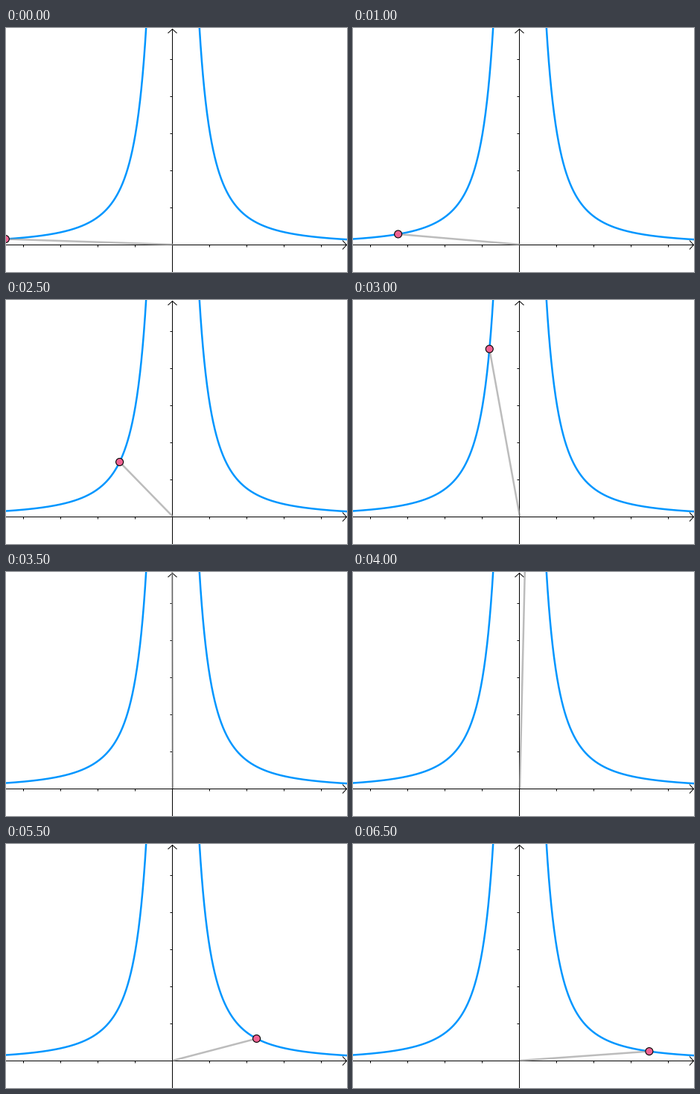
Animation of 458 by 329 pixels, one loop 7000 ms. Source, as a matplotlib script:

```python
import numpy as np
import matplotlib.pyplot as plt
from matplotlib.animation import FuncAnimation
from matplotlib.patches import Circle

W, H, DPI = 458, 329, 64
OX, OY, UNIT = 224, 292, 50      # origin of the curve
AX, AY = 223.5, 292.5            # axis lines, on pixel centres
STEPS, STEP_MS = 14, 500
START_X, STEP_X = -0.7, 30.66


def px(width):
    """Pixels to points."""
    return width * 72 / DPI


def curve_y(x):
    u = (x - OX) / UNIT
    return OY - UNIT * 3 / u ** 2


fig = plt.figure(figsize=(W / DPI, H / DPI), dpi=DPI, facecolor="white")
ax = fig.add_axes([0, 0, 1, 1])
ax.set_xlim(0, W)
ax.set_ylim(H, 0)
ax.axis("off")


def stroke(xs, ys, color="black", width=1.0, z=1, **kw):
    return ax.plot(xs, ys, color=color, lw=px(width), zorder=z, snap=False,
                   solid_capstyle="butt", **kw)[0]


# axes with open arrowheads
stroke([0, W], [AY, AY])
stroke([AX, AX], [1, H])
stroke([W - 6, W - 0.5, W - 6], [AY - 6, AY, AY + 6])
stroke([AX - 6, AX, AX + 6], [7, 1.5, 7])

# ticks
for k in range(-4, 5):
    if k:
        x = AX + k * UNIT
        stroke([x, x], [AY, AY + 3])
for k in range(1, 6):
    y = AY - k * UNIT
    stroke([AX - 3, AX], [y, y])

# both branches of y = 3 / x^2
for side in (-1, 1):
    xs = OX + side * np.linspace(34, 240, 500)
    stroke(xs, curve_y(xs), "#0096ff", 2.5, z=2)

ray = stroke([], [], "0.6", 2.5, z=3, alpha=0.65)
dot = Circle((0, 0), 5, facecolor="#f06292", edgecolor="black",
             lw=px(1.1), zorder=4, snap=False)
ax.add_patch(dot)


def update(i):
    x = START_X + i * STEP_X
    y = curve_y(x)
    ray.set_data([OX, x], [OY, y])
    dot.center = (x, y)
    return ray, dot


anim = FuncAnimation(fig, update, frames=STEPS, init_func=lambda: update(0),
                     interval=STEP_MS, repeat=True, repeat_delay=0, blit=False)
plt.show()
```
